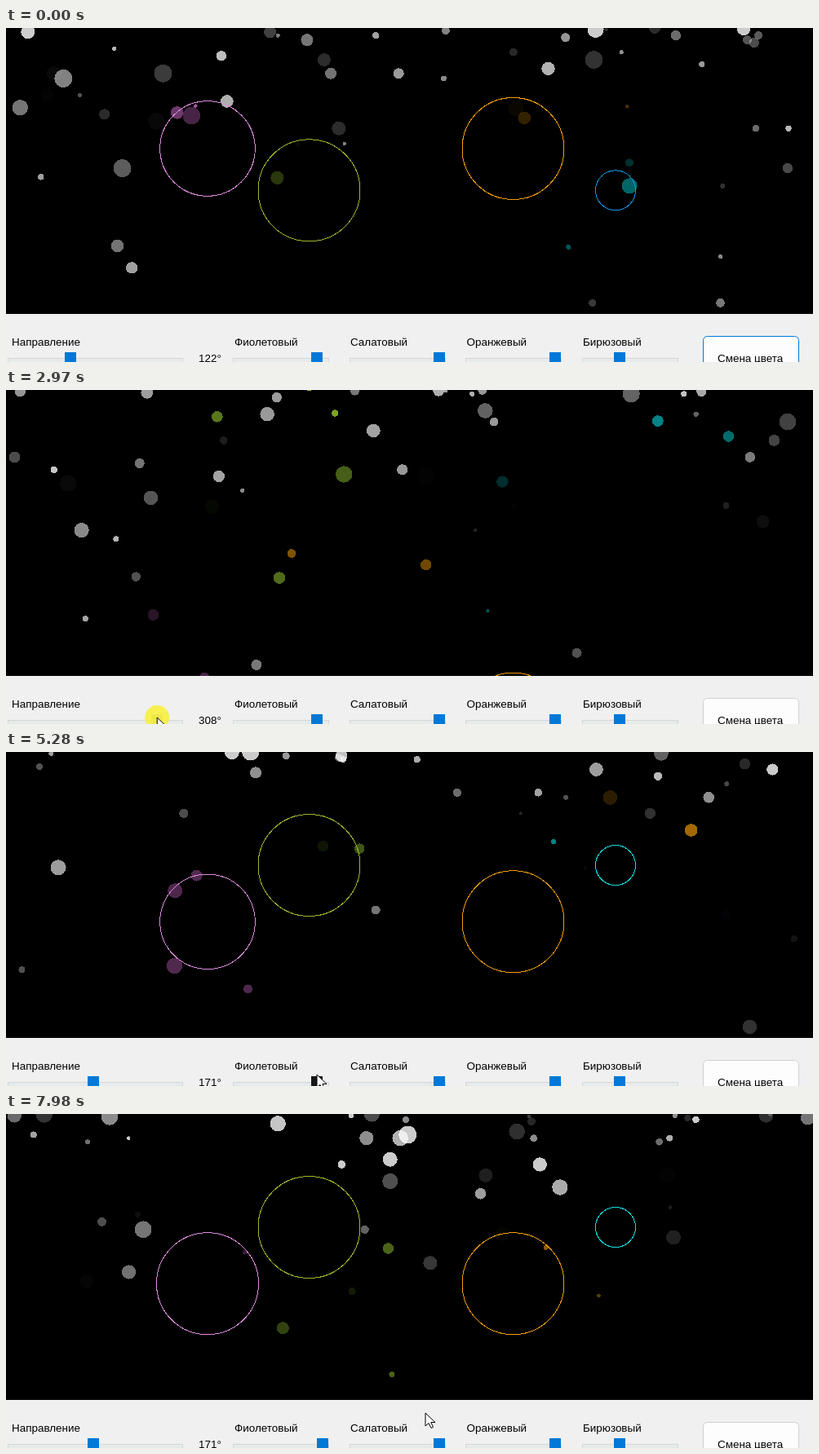
An HTML page that plays this animation: 989x410 px, repeating every 8000 ms.

```html
<!DOCTYPE html>
<html lang="ru">
<head>
<meta charset="utf-8">
<title>Частицы</title>
<style>
html, body { margin: 0; width: 100%; height: 100%; overflow: hidden; background: #000; }
svg { position: absolute; left: 0; top: 0; width: 989px; height: 410px; }
text { font: 13.45px "Liberation Sans", Arial, sans-serif; fill: #000; }
#particles, #rings { shape-rendering: crispEdges; }
#rings { fill: none; }
.track { fill: #e7eaea; stroke: #d6d6d6; }
</style>
</head>
<body>
<svg viewBox="0 0 989 410">
  <g id="particles"></g>
  <g id="rings"></g>
  <rect y="351" width="989" height="60" fill="#f0f0f0"/>
  <text x="7" y="390">Направление</text>
  <text x="280" y="390">Фиолетовый</text>
  <text x="422" y="390">Салатовый</text>
  <text x="564.5" y="390">Оранжевый</text>
  <text x="707" y="390">Бирюзовый</text>
  <text id="degrees" x="236" y="409.5"></text>
  <rect id="button" x="854.5" y="378.5" width="117" height="40" rx="5" fill="#fdfdfd"/>
  <text x="872" y="410">Смена цвета</text>
  <g id="sliders"></g>
  <circle id="glow" r="15" fill="#f8f024" opacity=".78"/>
  <path id="cursor" d="M0 0V16L4 12.5L7 18.5L9.5 17.3L6.8 11.5H12Z" fill="#fff" stroke="#000"/>
</svg>
<script>
const LOOP = 8000, STEPS = 119, STEP = LOOP / STEPS;
const WARM_UP = 60, TICKS = 2, COUNT = 70;
const GRAVITY = 0.326, FADE = 120, MAX_ALPHA = 0.8;
const RING_LAG = 93;
const VIOLET = '#da70d6', LIME = '#9acd32', ORANGE = '#ffa500', TURQUOISE = '#00ced1';

const $ = id => document.getElementById(id);

let seed = 7;
function random(min, max) {
  seed = (seed * 1664525 + 1013904223) % 4294967296;
  return min + (max - min) * seed / 4294967296;
}

function ease(t, from, to) {
  const u = Math.min(1, Math.max(0, (t - from) / (to - from)));
  return u * u * (3 - 2 * u);
}

// The two sliders that are dragged
const angleAt = t =>
  122 + 223 * ease(t, 1750, 2500) - 323 * ease(t, 2769, 3669) + 149 * ease(t, 4150, 4850);
const violetDrag = t => 381 - 110 * ease(t, 5400, 6150) + 117 * ease(t, 6450, 7350);
const violetThumb = t => Math.max(285, violetDrag(t));
const angleThumb = t => 78.5 + (angleAt(t) - 122) * 0.573;

function pointerAt(t) {
  const across = ease(t, 4850, 5150), leave = ease(t, 7350, 7800);
  return {
    x: angleThumb(t) * (1 - across) + violetDrag(t) * across + 126 * leave,
    y: 440 - 38 * ease(t, 1100, 1600) - 6 * across - 29 * leave
  };
}

function ringsAt(t) {
  const down = 25 + 1.23 * (angleAt(t - RING_LAG) - 22), up = 347.3 - down;
  return [
    { x: 247, y: down, r: (violetThumb(t) - 285) * 0.607, color: VIOLET, stroke: '#dc8cdc' },
    { x: 371.5, y: up, r: 62.5, color: LIME, stroke: '#9cb82c' },
    { x: 621.5, y: down, r: 62.5, color: ORANGE, stroke: '#f09c08' },
    { x: 747, y: up, r: 24.5, color: TURQUOISE, stroke: `hsl(${Math.max(181, 203 - t / 110)}, 85%, 48%)` }
  ];
}

function spawn(p) {
  return Object.assign(p, {
    x: random(0, 989), y: 0, vx: random(-1.5, 1.5), vy: 0,
    r: random(2, 11), life: random(20, 120), color: '#fff'
  });
}

function advance(p, rings) {
  if (--p.life <= 0) return spawn(p);
  p.vy += GRAVITY;
  p.x += p.vx;
  p.y += p.vy;
  const ring = rings.find(c => Math.hypot(p.x - c.x, p.y - c.y) < c.r);
  if (ring && p.color !== ring.color) {
    p.color = ring.color;
    p.vx = random(-8, 8);
    p.vy = random(-4, 4);
  }
}

// Every step is simulated once, so drawing depends on time alone
function simulate() {
  const particles = Array.from({ length: COUNT }, () => spawn({}));
  const states = [];
  for (let step = -WARM_UP; step < STEPS; step++) {
    const rings = ringsAt(step * STEP);
    for (let i = 0; i < TICKS; i++) particles.forEach(p => advance(p, rings));
    if (step >= 0) states.push(particles.map(p => ({ ...p })));
  }
  return states;
}

function set(node, attributes) {
  for (const name in attributes) node.setAttribute(name, attributes[name]);
  return node;
}

function add(parent, tag, attributes = {}) {
  const node = document.createElementNS('http://www.w3.org/2000/svg', tag);
  return $(parent).appendChild(set(node, attributes));
}

function addSlider(x, width, thumb) {
  add('sliders', 'rect', { class: 'track', x: x + 0.5, y: 405.5, width, height: 8 });
  return add('sliders', 'rect', { x: thumb - 7, y: 398, width: 14, height: 14, fill: '#0078d7' });
}

const states = simulate();
const dots = states[0].map(() => add('particles', 'circle'));
const circles = ringsAt(0).map(() => add('rings', 'circle'));
const angleKnob = addSlider(2, 214, 78);
const violetKnob = addSlider(278, 117, 381);
addSlider(421, 117, 531);
addSlider(563, 117, 673);
addSlider(706, 117, 752);

function drawSky(step, t) {
  states[step].forEach((p, i) => set(dots[i], {
    cx: p.x, cy: p.y, r: p.r, fill: p.color, opacity: Math.min(MAX_ALPHA, p.life / FADE)
  }));
  ringsAt(t).forEach(({ x, y, r, stroke }, i) => set(circles[i], {
    cx: x, cy: y, r, stroke: r < 1 ? 'none' : stroke
  }));
}

function drawPanel(t) {
  const within = (from, to) => t >= from && t < to;
  const turning = within(1750, 4850), sizing = within(5400, 7350);
  const knobColor = (drag, hover) => drag ? '#ccc' : hover ? '#171717' : '#0078d7';
  $('degrees').textContent = Math.round(angleAt(t)) + '°';
  set(angleKnob, { x: Math.round(angleThumb(t) - 7), fill: knobColor(turning) });
  set(violetKnob, { x: Math.round(violetThumb(t) - 7), fill: knobColor(sizing, within(5120, 5400)) });
  set($('button'), { stroke: t < 1750 ? '#0078d7' : '#d0d0d0' });
  const { x, y } = pointerAt(t), transform = `translate(${x} ${y})`;
  set($('cursor'), { transform });
  set($('glow'), { transform, visibility: turning || sizing ? 'visible' : 'hidden' });
}

const start = performance.now();
let shown = -1;
function tick() {
  const step = Math.floor((performance.now() - start) % LOOP / STEP);
  if (step !== shown) {
    shown = step;
    drawSky(step, step * STEP);
    drawPanel(step * STEP);
  }
  requestAnimationFrame(tick);
}
tick();
</script>
</body>
</html>
```
